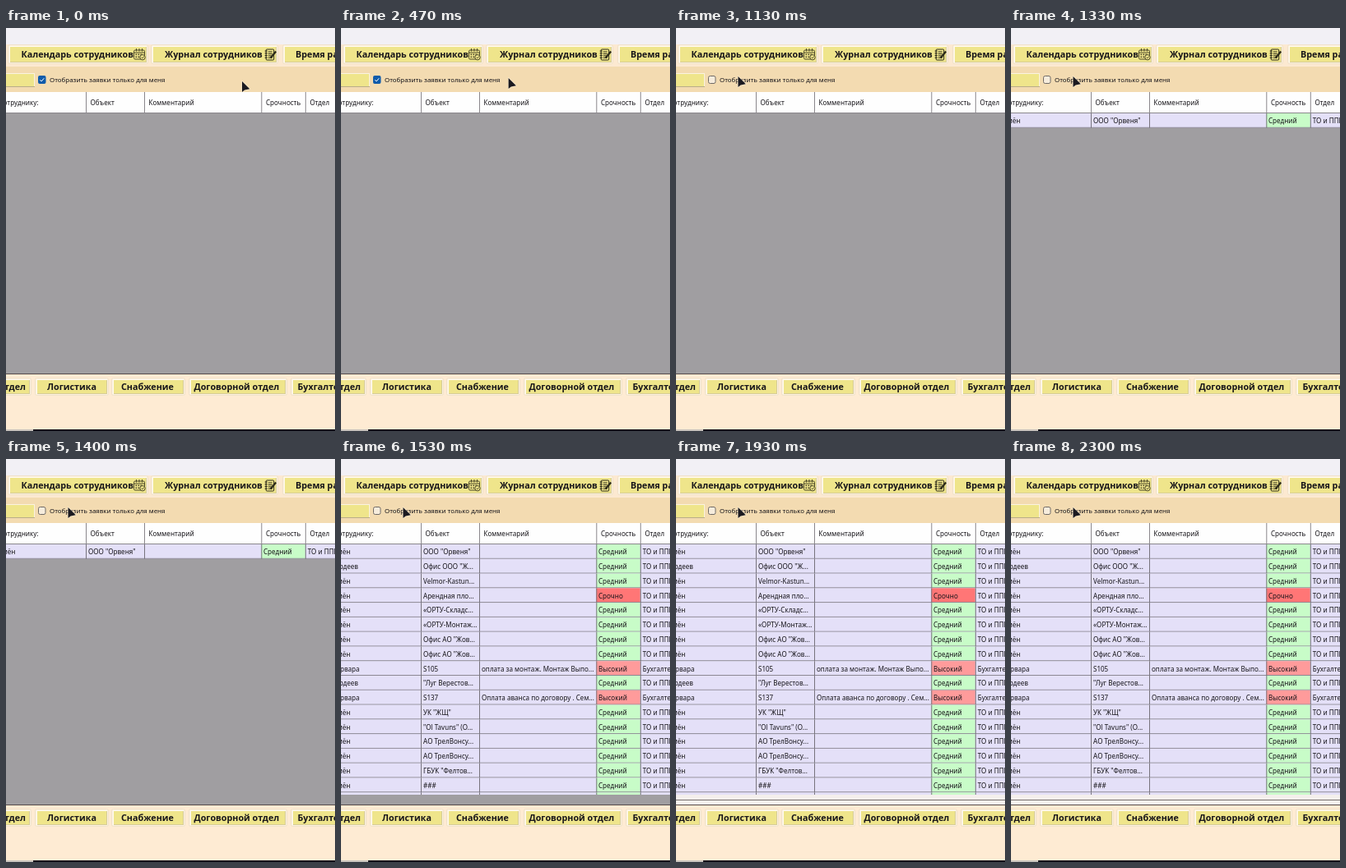
An HTML page with a canvas that plays this animation: 400 px wide and 491 px high, repeating every 2.33 s.

```html
<!DOCTYPE html>
<html lang="ru">
<head>
<meta charset="utf-8">
<style>
  html, body { margin: 0; width: 100%; height: 100%; overflow: hidden; background: #f2f0f5; }
  canvas { display: block; width: 400px; height: 491px; }
</style>
</head>
<body>
<canvas id="stage"></canvas>
<script>
const W = 400, H = 491, LOOP = 2330, TICK = 100 / 3;
const UNCHECK = 1130, FIRST_ROW = 1170, ALL_ROWS = 1430, SCROLL_BAR = 1670;
const ROW_TOP = 104, ROW_H = 17.78, COLS = [97, 168, 310.3, 363.8];

const canvas = document.getElementById('stage');
const ctx = canvas.getContext('2d');
const dpr = window.devicePixelRatio || 1;
canvas.width = W * dpr;
canvas.height = H * dpr;

const PLAIN = '8.05px "Noto Sans", "Open Sans", sans-serif';
const LABEL = '7.9px "Noto Sans", "Open Sans", sans-serif';
const BOLD = 'bold 10.75px "Noto Sans", "Open Sans", sans-serif';

// time, x, y of the pointer tip
const PATH = [
  [0, 287, 65], [240, 247, 63], [470, 203, 61], [530, 186, 60.5],
  [830, 100, 58], [930, 81, 58.5], [1000, 75.5, 59], [LOOP, 75.5, 59]
];

const MID = ['Средний', '#c8fcc8'], HIGH = ['Высокий', '#ff9b9b'], URGENT = ['Срочно', '#ff7676'];
const P = 'мён', L = 'рдеев', N = 'арвара';
const ROWS = [
  [P, 'ООО "Орвеня"'],
  [L, 'Офис ООО "Ж...'],
  [P, 'Velmor-Kastun...'],
  [P, 'Арендная пло...', URGENT],
  [P, '«ОРТУ-Складс...'],
  [P, '«ОРТУ-Монтаж...'],
  [P, 'Офис АО "Жов...'],
  [P, 'Офис АО "Жов...'],
  [N, 'S105', HIGH, 'оплата за монтаж. Монтаж Выпо...'],
  [L, '"Луг Верестов...'],
  [N, 'S137', HIGH, 'Оплата аванса по договору . Сем...'],
  [P, 'УК "ЖЩ"'],
  [P, '"Ol Tavuns" (О...'],
  [P, 'АО ТрелВонсу...'],
  [P, 'АО ТрелВонсу...'],
  [P, 'ГБУК "Фелтов...'],
  [P, '###'],
  ['', '']
];

function rect(x, y, w, h, color) {
  ctx.fillStyle = color;
  ctx.fillRect(x, y, w, h);
}

function round(x, y, w, h, r, fill, stroke) {
  ctx.beginPath();
  ctx.roundRect(x, y, w, h, r);
  if (fill) { ctx.fillStyle = fill; ctx.fill(); }
  if (stroke) { ctx.strokeStyle = stroke; ctx.lineWidth = 1; ctx.stroke(); }
}

function text(str, x, y, font = PLAIN, align = 'left') {
  ctx.font = font;
  ctx.textAlign = align;
  ctx.fillStyle = '#17151a';
  ctx.fillText(str, x, y);
}

function line(points, color, width = 1) {
  ctx.beginPath();
  points.forEach(([x, y]) => ctx.lineTo(x, y));
  ctx.strokeStyle = color;
  ctx.lineWidth = width;
  ctx.stroke();
}

function button(x, y, w, h, label, tx, align) {
  round(x + .5, y + .5, w - 1, h - 1, 2, '#fdf1de', '#f0e2ca');
  rect(x + 2, y + 2, w - 4, h - 4, '#fffaf0');
  rect(x + 3, y + 3, w - 5, h - 5, '#d6cc98');
  rect(x + 3, y + 3, w - 6, h - 6, '#efe58b');
  text(label, tx, y + h / 2 + 4, BOLD, align);
}

function calendarIcon(x, y) {
  const ink = '#4c4829';
  round(x + .5, y + 1.5, 13, 11, 1.5, null, ink);
  line([[x, y + 4.5], [x + 14, y + 4.5]], ink);
  for (const dx of [3.5, 7, 10.5]) line([[x + dx, y - .5], [x + dx, y + 3]], ink);
  for (let i = 0; i < 6; i++) rect(x + 2.5 + i % 3 * 3, y + 6 + (i / 3 | 0) * 3, 1.6, 1.6, ink);
  ctx.beginPath();
  ctx.arc(x + 11, y + 10.2, 3.2, 0, 7);
  ctx.fillStyle = '#efe58b';
  ctx.fill();
  ctx.strokeStyle = ink;
  ctx.stroke();
  line([[x + 9.5, y + 10.2], [x + 10.8, y + 11.5], [x + 12.7, y + 9]], ink, .9);
}

function journalIcon(x, y) {
  const ink = '#2c2a19';
  round(x + 1.5, y + .5, 9.5, 13, 1, null, ink);
  for (let i = 0; i < 4; i++) {
    rect(x, y + 2 + i * 2.7, 3, 1.1, ink);
    rect(x + 4, y + 3 + i * 2.4, 5, 1, ink);
  }
  line([[x + 7, y + 11], [x + 13.5, y + 3]], ink, 2.2);
}

function checkbox(on, hover) {
  if (!on) return round(39.5, 58.5, 8.5, 9, 2, '#f6ecdc', '#6f6a66');
  round(39, 58, 9.5, 10, 2, hover ? '#1a69c6' : '#0f5bab');
  line([[41.4, 63.2], [43.1, 65], [46.2, 61.3]], '#fff', 1);
}

function drawRow([who, place, level = MID, note = ''], i) {
  const y = ROW_TOP + i * ROW_H, base = y + 12.3;
  rect(0, y, W, ROW_H, '#e4e0f8');
  rect(COLS[2], y, COLS[3] - COLS[2], ROW_H, level[1]);
  rect(0, y + ROW_H - 1, W, 1, '#8b8792');
  COLS.forEach(x => rect(x, y, 1, ROW_H, '#77737d'));
  if (!place) return;
  text(who, who === P ? 11.5 : who === L ? 21 : 22.5, base, PLAIN, 'right');
  text(place, 100, base);
  text(note, 171, base);
  text(level[0], 313, base);
  text(level === HIGH ? 'Бухгалтерия' : 'ТО и ППР', 366.8, base);
}

function drawTable(t) {
  rect(0, 78, W, 26, '#fefefe');
  rect(0, 103, W, 1, '#8a878c');
  COLS.forEach(x => rect(x, 78, 1, 26, '#8a878c'));
  text('сотруднику:', 39.5, 94, PLAIN, 'right');
  text('Объект', 102.5, 94);
  text('Комментарий', 173.5, 94);
  text('Срочность', 316, 94);
  text('Отдел', 369.5, 94);

  rect(0, 104, W, 317, '#a09ea1');
  const count = t < FIRST_ROW ? 0 : t < ALL_ROWS ? 1 : ROWS.length;
  ctx.save();
  ctx.beginPath();
  ctx.rect(0, 104, W, 305);
  ctx.clip();
  ROWS.slice(0, count).forEach(drawRow);
  ctx.restore();
  if (t >= SCROLL_BAR) {
    rect(0, 409, W, 12, '#f4efec');
    rect(0, 415, W, 1, '#77716f');
  }
  rect(0, 421, W, 1, '#554c4b');
}

function drawPanels(t, tipX) {
  rect(0, 0, W, 20, '#f2f0f5');
  rect(0, 20, W, 27, '#fce9d1');
  rect(0, 47, W, 31, '#f3dbb1');
  button(2, 20, 171, 24, 'Календарь сотрудников', 18.5);
  button(176, 20, 155, 24, 'Журнал сотрудников', 193);
  button(336, 20, 140, 24, 'Время работы', 352);
  calendarIcon(155, 25.5);
  journalIcon(314.7, 25.5);

  rect(-2, 55, 37, 17, '#fbf3df');
  rect(-2, 56, 36, 15, '#efe58b');
  rect(-2, 71, 37, 1, '#b9ad8a');
  checkbox(t < UNCHECK, tipX < 195);
  text('Отобразить заявки только для меня', 53, 66, LABEL);

  rect(0, 422, W, 67, '#feebd3');
  button(-60, 426, 91, 22, 'Отдел', 24, 'right');
  button(35, 426, 90, 22, 'Логистика', 50);
  button(128, 426, 90, 22, 'Снабжение', 140);
  button(222, 426, 120, 22, 'Договорной отдел', 228.5);
  button(346, 426, 100, 22, 'Бухгалтерия', 354.5);
  rect(0, 489, 33, 2, '#c9c3bd');
  rect(33, 489, W - 33, 2, '#15121a');
}

function pointerAt(t) {
  const i = PATH.findIndex(p => p[0] > t);
  const [t0, x0, y0] = PATH[i - 1], [t1, x1, y1] = PATH[i];
  const k = (t - t0) / (t1 - t0);
  return [x0 + (x1 - x0) * k, y0 + (y1 - y0) * k];
}

function drawPointer(x, y) {
  ctx.beginPath();
  [[0, 0], [0, 13], [3.2, 10.4], [9.3, 9.2]].forEach(([dx, dy]) => ctx.lineTo(x + dx, y + dy));
  ctx.closePath();
  ctx.lineJoin = 'round';
  ctx.strokeStyle = 'rgba(255, 245, 225, .6)';
  ctx.lineWidth = 1.4;
  ctx.stroke();
  ctx.fillStyle = '#1b1a20';
  ctx.fill();
}

function draw(t) {
  const [x, y] = pointerAt(t);
  ctx.setTransform(dpr, 0, 0, dpr, 0, 0);
  drawPanels(t, x);
  drawTable(t);
  drawPointer(x, y);
}

const start = performance.now();
function loop() {
  const t = (performance.now() - start) % LOOP;
  draw(Math.min(Math.floor((t + 4) / TICK) * TICK, LOOP - 1));
  requestAnimationFrame(loop);
}
loop();
</script>
</body>
</html>
```
